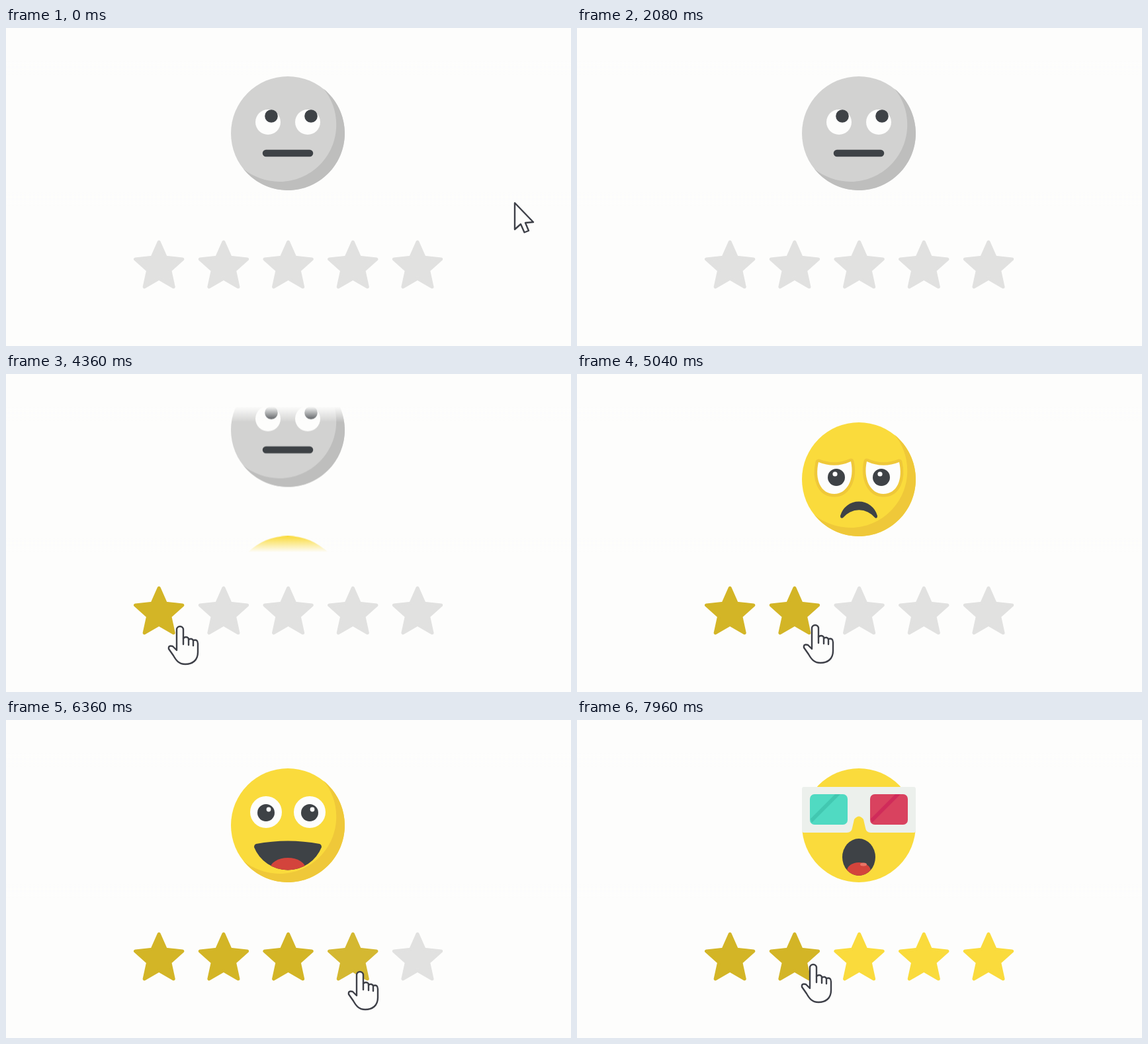
An HTML page that plays this animation: 854x480 px, repeating every 8 s.

```html
<!DOCTYPE html>
<html lang="en">
<head>
<meta charset="utf-8">
<title>Star rating</title>
<style>
  html, body { margin: 0; width: 100%; height: 100%; overflow: hidden; background: #fdfdfc; }
  svg { display: block; width: 854px; height: 480px; }
  .dark { fill: #3e4246; }
  .white { fill: #fdfdfc; }
  .red { fill: #d3443c; }
  .skin { fill: #fadb3c; }
  .shadow { fill: #efc839; }
  .line { fill: none; stroke: #3e4246; stroke-linecap: round; }
  #cursor path { fill: #fdfdfc; stroke: #3e4048; stroke-width: 2.4; stroke-linejoin: round; stroke-linecap: round; }
</style>
</head>
<body>
<svg viewBox="0 0 854 480">
  <defs>
    <clipPath id="window"><rect y="36" width="854" height="246"/></clipPath>
    <clipPath id="grin"><path d="M-44 34Q-44 29-37 30Q0 36 37 30Q44 29 43 35C37 53 20 62 0 62S-38 53-44 34z"/></clipPath>
    <clipPath id="gasp"><ellipse cy="48" rx="25" ry="28"/></clipPath>
    <clipPath id="laugh"><path d="M51 33A55 55 0 0 1-51 33Q-51 29-48 28Q0 19 48 28Q51 29 51 33z"/></clipPath>
    <linearGradient id="fade" x2="0" y2="1">
      <stop offset=".35" stop-color="#fdfdfc"/>
      <stop offset="1" stop-color="#fdfdfc" stop-opacity="0"/>
    </linearGradient>
    <path id="shade" transform="translate(-86 -86) scale(.336)" d="M512 256c0 141-115 256-256 256-80 0-152-37-199-95 44 35 100 56 161 56 141 0 256-114 256-256 0-61-21-117-57-161 58 48 95 120 95 200z"/>
    <path id="heart" d="M0 23C-8 17-25 6-25-8C-25-25-5-27 0-13C5-27 25-25 25-8C25 6 8 17 0 23z"/>
    <path id="sadEye" d="M-61-26Q-36-16-12-27C-6 0-18 22-37 22C-58 22-67 0-61-26z"/>
    <g id="pupil"><circle r="13" class="dark"/><circle cx="4" cy="-5" r="3.4" class="white"/></g>
    <g id="sadPupil"><circle r="13" class="dark"/><circle cx="-2" cy="-5" r="3.6" class="white"/></g>
    <g id="head"><circle r="86" class="skin"/><use href="#shade" class="shadow"/></g>
  </defs>

  <g clip-path="url(#window)">
    <g id="strip">
      <g class="face">
        <circle r="86" fill="#d2d2d1"/><use href="#shade" fill="#bebebd"/>
        <g class="white"><circle cx="-30" cy="-17" r="19"/><circle cx="30" cy="-17" r="19"/></g>
        <g class="dark"><circle cx="-25" cy="-26" r="9.8"/><circle cx="35" cy="-26" r="9.8"/></g>
        <path class="line" stroke-width="10.5" d="M-33 30H33"/>
      </g>
      <g class="face">
        <use href="#head"/>
        <g class="white" stroke="#efc839" stroke-width="9" stroke-linejoin="round" paint-order="stroke">
          <use href="#sadEye"/><use href="#sadEye" transform="scale(-1 1)"/>
        </g>
        <use href="#sadPupil" x="-34" y="-3"/><use href="#sadPupil" x="34" y="-3"/>
        <path class="dark" d="M24.5 58A31 31 0 0 0-24 58Q-28 60-28 55A29 29 0 0 1 28 55Q28 60 24.5 58z"/>
      </g>
      <g class="face">
        <use href="#head"/>
        <g class="white"><circle cx="-34" cy="-3" r="27"/><circle cx="33" cy="-3" r="27"/></g>
        <use href="#pupil" x="-29" y="2"/><use href="#pupil" x="28" y="2"/>
        <path class="line" stroke-width="10.5" d="M-23 48Q0 33 23 48"/>
      </g>
      <g class="face">
        <use href="#head"/>
        <g class="white"><circle cx="-33" cy="-20" r="24"/><circle cx="33" cy="-20" r="24"/></g>
        <use href="#pupil" x="-33" y="-19"/><use href="#pupil" x="33" y="-19"/>
        <g clip-path="url(#laugh)"><rect class="dark" x="-60" y="15" width="120" height="60"/><ellipse class="red" cy="66" rx="27" ry="17"/></g>
      </g>
      <g class="face">
        <use href="#head"/>
        <g class="red"><use href="#heart" x="-33" y="-9"/><use href="#heart" x="33" y="-9"/></g>
        <g class="white"><ellipse cx="-16" cy="-21" rx="4" ry="2.7" transform="rotate(40 -16 -21)"/><ellipse cx="50" cy="-21" rx="4" ry="2.7" transform="rotate(40 50 -21)"/></g>
        <g clip-path="url(#grin)"><rect class="dark" x="-50" y="25" width="100" height="40"/><path class="red" d="M-24 60Q-16 44 1 46Q17 40 24 55V65H-24z"/></g>
      </g>
      <g class="face">
        <circle r="86" class="skin"/>
        <path fill="#ecf0ec" d="M-83-58H83Q86-58 86-55V8Q86 11 83 11H18Q11 11 10 4L7-9Q0-18-7-9L-10 4Q-11 11-18 11H-83Q-86 11-86 8V-55Q-86-58-83-58z"/>
        <rect x="-74" y="-47" width="57" height="46" rx="7" fill="#50dac2"/>
        <rect x="17" y="-47" width="57" height="46" rx="7" fill="#d9425f"/>
        <path fill="#42c8b1" d="M-73-10L-36-47H-28L-71-4z"/>
        <path fill="#d02b5a" d="M18-10L55-47H63L20-4z"/>
        <g clip-path="url(#gasp)"><rect class="dark" x="-30" y="18" width="60" height="60"/><ellipse class="red" cy="69" rx="18" ry="13"/><ellipse cx="7" cy="59" rx="5" ry="2.5" fill="#ea7466"/></g>
      </g>
    </g>
    <rect y="36" width="854" height="37" fill="url(#fade)"/>
    <rect y="36" width="854" height="37" fill="url(#fade)" transform="matrix(1 0 0 -1 0 318)"/>
  </g>

  <g id="stars" stroke-width="5" stroke-linejoin="round"></g>

  <g id="cursor">
    <path id="arrow" d="M1 1V41L10 33L15.500 45.500L22 43L17 31L29 30z"/>
    <g id="hand">
      <path d="M-5 36V5a5 5 0 0 1 10 0V18q4-4 8 0v2q4-3 7 1q7-2 7 5V39C27 51 19 57 8 57C-2 57-6 51-10 44L-17 34q-1-6 6-4z"/>
      <path d="M5 18v9M13 19v9M20 21v8"/>
    </g>
  </g>
</svg>
<script>
const LOOP = 8000, FADE = 300, PITCH = 246;
const GREY = '#e1e1e0', GOLD = '#fadb3c', HOVER = '#d3b526';
const $ = id => document.getElementById(id);

// steps: [time, value, easing towards the next step]
function play(el, prop, steps) {
  const frames = steps.map(([t, value, easing = 'linear']) => ({ offset: t / LOOP, [prop]: value, easing }));
  frames.unshift({ ...frames[0], offset: 0, easing: 'linear' });
  frames.push({ ...frames[frames.length - 1], offset: 1 });
  el.animate(frames, { duration: LOOP, iterations: Infinity });
}

// Holds each value, then eases to the next one at each change time.
function transitions(first, changes) {
  let last = first;
  return changes.flatMap(([t, value]) => {
    const pair = [[t, last, 'ease'], [t + FADE, value]];
    last = value;
    return pair;
  });
}

const slide = n => `translate(426px, ${159 - n * PITCH}px)`;
document.querySelectorAll('.face').forEach((face, i) => face.setAttribute('transform', `translate(0 ${i * PITCH})`));
const clicks = [4300, 5150, 5950, 6500, 7100];
play($('strip'), 'transform', transitions(slide(0), clicks.map((t, i) => [t, slide(i + 1)])));

const hoverOn = [2850, 4590, 5365, 6150, 6690];
const hoverOff = [null, null, 7570, 7445, 7375];
const points = Array.from({ length: 10 }, (_, k) => {
  const r = k % 2 ? 17.5 : 37.5, a = k * Math.PI / 5;
  return `${(r * Math.sin(a)).toFixed(2)},${(-r * Math.cos(a)).toFixed(2)}`;
}).join(' ');

hoverOn.forEach((on, i) => {
  const star = document.createElementNS('http://www.w3.org/2000/svg', 'polygon');
  star.setAttribute('points', points);
  star.setAttribute('transform', `translate(${231.2 + 97.7 * i} 360.5)`);
  $('stars').append(star);
  const changes = [[on, HOVER]];
  if (hoverOff[i]) changes.push([hoverOff[i], GOLD]);
  for (const prop of ['fill', 'stroke']) play(star, prop, transitions(GREY, changes));
});

const path = [
  [0, 768, 263], [700, 768, 263], [1250, 710, 310], [1900, 610, 500], [2350, 330, 500],
  [3000, 263, 381], [4450, 263, 381], [4900, 360, 379], [5250, 360, 379],
  [5600, 438, 379], [6000, 438, 379], [6350, 535, 380], [6550, 535, 380],
  [6900, 634, 381], [7250, 634, 381], [7650, 362, 373], [7960, 357, 369]
];
play($('cursor'), 'transform', path.map(([t, x, y]) => [t, `translate(${x}px, ${y}px)`, 'ease-in-out']));
play($('arrow'), 'opacity', [[0, 1], [hoverOn[0], 1], [hoverOn[0], 0]]);
play($('hand'), 'opacity', [[0, 0], [hoverOn[0], 0], [hoverOn[0], 1]]);
</script>
</body>
</html>
```
